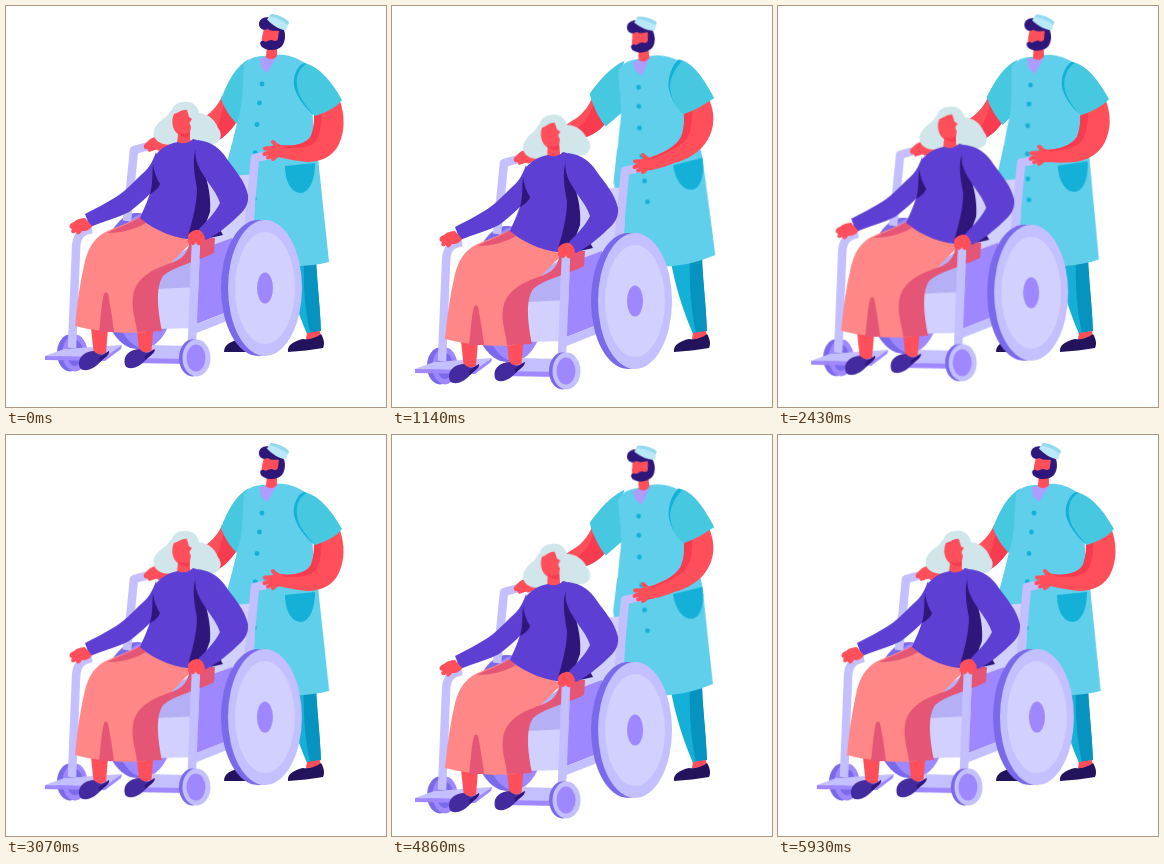
Recreate the animation shown at these times as an HTML page. Size 380 by 401 pixels, loop 6 s.

```html
<!DOCTYPE html>
<html lang="en">
<head>
<meta charset="utf-8">
<title>Nurse pushing a wheelchair</title>
<style>
html,body{margin:0;width:100%;height:100%;overflow:hidden;background:#fff}
svg{display:block;width:100vw;height:100vh}
/* every part swings along one sine, 1.5 s each way */
.chair,.lean,.nod,.sway,.morph{animation:1500ms cubic-bezier(.3642,0,.6358,1) infinite alternate}
.chair{animation-name:push}
.lean{animation-name:lean;transform-origin:274px 145px}
.nod{animation-name:nod;transform-origin:178px 135px}
.sway{animation-name:sway;animation-delay:-750ms;transform-origin:0 150px}
.morph{animation-name:morph}
@keyframes push{from{transform:translate(0,0)}to{transform:translate(-18.5px,15px)}}
@keyframes lean{from{transform:rotate(0deg)}to{transform:rotate(-9.5deg)}}
@keyframes nod{from{transform:rotate(0deg)}to{transform:rotate(-5deg)}}
@keyframes sway{from{transform:skewX(-1.05deg)}to{transform:skewX(1.05deg)}}
@keyframes morph{to{d:var(--to)}}
.skin{fill:#ff4f5b}.skin2{fill:#f93b4f}
.coat{fill:#5fcfeb}.sleeve{fill:#46c8e0}.trim{fill:#14b0d8}.deep{fill:#0793c0}
.ink{fill:#2f167a}.shoe{fill:#23125c}
.knit{fill:#5d3fd3}.slip{fill:#432a9f}
.pink{fill:#ff8787}.rose{fill:#e55575}
.pale{fill:#d1d0ff}.lilac{fill:#c4bfff}.mid{fill:#9f88ff}.dark{fill:#7a69ea}
.hair{fill:#d0e6ea}
.bar{fill:none;stroke:#c4bfff;stroke-width:8.5;stroke-linejoin:round}
.finger{fill:none;stroke:#ff4f5b;stroke-width:4;stroke-linecap:round}
</style>
</head>
<body>
<svg viewBox="0 0 380 401" preserveAspectRatio="none">

<!-- nurse: legs, far arm, coat, head -->
<path class="shoe" d="M218 346C218 338 225 335 236 333L244 346Z"/>
<path class="trim" d="M278 250C282 276 290 302 301 328L315 325C314 300 311 275 309 250Z"/>
<path class="deep" d="M298 250C297 280 299 305 304 327L315 325C314 300 311 275 310 250Z"/>
<path class="skin" d="M301 327L314 325L315 334C309 336 304 335 300 333Z"/>
<path class="shoe" d="M282 346C281 339 288 335 297 333C303 334 310 332 315 328C318 333 319 338 317 342C306 344 294 345 282 346Z"/>

<path class="skin morph" d="M216 90C212 100 204 108 194 114L150 134L152 145L205 138C216 134 224 126 232 114Z"
 style="--to:path('M200 85C197 97 190 108 178 115L131 149L133 160L185 133C197 129 207 124 214 114Z')"/>
<path class="skin2 morph" d="M232 114C224 126 216 134 205 138L206 128C213 120 215 112 218 98Z"
 style="--to:path('M213 114C207 124 197 129 185 133L177 124C190 118 195 110 200 94Z')"/>
<path class="sleeve morph" d="M243 53C230 60 222 75 215 93C219 103 224 111 231 118L240 108L242 56Z"
 style="--to:path('M231 55C216 62 205 74 195 87C198 100 204 112 211 121L231 104L228 63Z')"/>

<g class="sway">
  <path class="coat morph" d="M226 138L218 168L228 258L270 260C290 261 308 260 323 256L312 152L308 138Z"
   style="--to:path('M225 144L222 178L238 258L262 261C284 261 304 256 322 248L310 150L307 138Z')"/>
</g>
<g class="lean">
  <path class="coat" d="M257 50C248 50 240 54 238 60C236 78 238 97 231 117L224 146L218 168L308 154C307 140 308 120 306 100L299 57C288 50 278 48 270 49Z"/>
  <path d="M254 52L272 49L261 67L255 61Z" fill="#ae9cff"/>
  <path class="skin" d="M261 40L271 41L271 50C268 54 263 54 260 51Z"/>
  <path class="trim" d="M279 160L309 157C309 173 304 186 295 187C285 187 279 175 279 160Z"/>
  <g class="trim">
    <circle cx="256" cy="78" r="2.4"/><circle cx="253.5" cy="97" r="2.4"/>
    <circle cx="251" cy="118.5" r="2.4"/><circle cx="249.2" cy="146.7" r="2.4"/>
    <circle cx="248.5" cy="171.7" r="2.4"/><circle cx="248.4" cy="192.7" r="2.4"/>
  </g>
  <path class="skin" d="M258 22L275 23L275 40L257 40C254 34 257 29 258 22Z"/>
  <path class="ink" d="M263 11.500C257 10.500 253 14 253 18C253 23 258 25 262 23C266 26 270 24 273 25L272 32C272 35 269 36 266 34C262 34 260 37 258 35C254 34 253 38 256 41C261 45.500 272 45 276 40C279 36 280 30 278 24L264 13Z"/>
  <path d="M265 8C271 8 279 12 283 16L280 24.500C274 24 266 19 261 13.500Z" fill="#b9e8f8"/>
  <path d="M265 8C271 8 279 12 283 16L282 19C277 15 270 11 263.500 10.500Z" fill="#93d9ee"/>
</g>

<!-- wheelchair and passenger -->
<g class="chair">
  <ellipse class="dark" cx="131" cy="275" rx="37" ry="68"/>
  <ellipse class="mid" cx="138" cy="275" rx="33" ry="67"/>
  <path class="bar" d="M150 138L128 144L121 215"/>
  <path class="skin" d="M154 131C149 130 146 132 143 134L138 139C137 142 139 144 141 143L143 146L149 144L156 143Z"/>

  <path class="pale" d="M200 172L250 168L247 240L190 245Z"/>
  <path class="pale" d="M145 276L192 272L190 322L152 323Z"/>
  <path d="M150 262L192 236L192 281L150 283Z" fill="#b5b0f6"/>
  <path class="mid" d="M188 246L226 232L226 304L188 319Z"/>
  <path class="lilac" d="M188 319L226 304L226 313L188 328Z"/>
  <path class="bar" d="M268 148L249 152L242 228"/>

  <ellipse class="dark" cx="64" cy="347" rx="13" ry="18.500"/>
  <ellipse class="mid" cx="69" cy="347" rx="12.500" ry="18.500"/>
  <ellipse class="dark" cx="69" cy="347" rx="8" ry="13"/>
  <path class="bar" d="M86 223C74 225 70 231 70 244L66 342"/>
  <path class="lilac" d="M39 350L58 343L116 339L99 352Z"/>
  <path class="mid" d="M39 350L99 351L116 339L115 343L99 355L39 354Z"/>
  <path class="lilac" d="M142 339L184 340L184 354L124 353Z"/>
  <path class="mid" d="M124 352L184 353L184 358L126 357Z"/>
  <path class="bar" d="M190 236L186 336"/>
  <ellipse class="dark" cx="186.500" cy="352" rx="13.500" ry="18.500"/>
  <ellipse class="lilac" cx="190.500" cy="352" rx="14" ry="18.500"/>
  <ellipse class="mid" cx="190" cy="352" rx="9.500" ry="13.500"/>

  <g id="foot">
    <path class="skin" d="M85 322L102 322L100 347L88 350Z"/>
    <path class="slip" d="M73 357C73 350 80 345 88 345C92 350 98 349 103 345C104 348 100 351 96 354C90 361 84 365 77 364C74 363 73 361 73 357Z"/>
    <path class="ink" d="M93 352L103 345C104 348 98 352 94 356Z"/>
  </g>
  <use href="#foot" x="45.500" y="-2"/>

  <path class="pink" d="M134 211C116 220 104 223 96 228C86 235 82 244 79 255C74 276 71 298 69 320C92 326 118 328 140 326L140 280L160 262L186 236Z"/>
  <path class="rose" d="M101 227C112 221 124 218 134 211L140 217C128 224 114 227 101 227Z"/>
  <path class="rose" d="M98 288C95 300 95 312 93 326L108 326C106 310 104 298 102 288C101 286 99 286 98 288Z"/>
  <path class="rose" d="M184 232L209 232L208 247C190 256 168 260 157 270C149 282 152 305 156 325L131 326C130 314 125 304 127 290C130 270 150 262 168 256C180 251 183 243 184 232Z"/>
  <path class="bar" d="M190 236L188 285"/>

  <path class="ink" d="M204 232L217 229L212 220Z"/>
  <g class="nod">
    <path class="hair" d="M178 96C186 95 192 100 193 107C203 108 209 114 212 122C217 128 215 136 208 138C198 140 190 138 184 134L172 137C162 141 149 138 147.500 128C147 120 155 114 160 111C163 108 164 105 166 104C167 99 172 96 178 96Z"/>
    <path class="skin" d="M168 108C172 107 177 103 181 104L183 111L186 113L183.500 117L185 121L184 126L184 138L171 138L172 128C166 124 165 114 168 108Z"/>
    <path class="skin2" d="M172 126C176 128 180 128 184 126L183 131C178 132 174 130 172 126Z"/>
  </g>

  <path class="knit" d="M172 136C160 138 148 146 146 158C150 180 140 198 134 212C150 226 172 233 188 234L201 200L200 150C200 142 196 134 187 133C182 138 176 138 172 136Z"/>
  <path class="knit" d="M150 146C146 158 141 164 135 169C126 178 118 186 110 191C100 197 89 203 79 208L84 221C98 215 112 212 123 206C134 198 142 190 148 184L154 160Z"/>
  <path class="ink" d="M147 158C146 168 147 178 144 188C150 185 153 181 154 178C150 172 148 165 147 158Z"/>
  <path class="ink" d="M193 137C185 148 188 166 191 182C191 198 187 212 182 230L196 228L204 206C205 194 203 182 200 172L192 152Z"/>
  <path class="knit" d="M192 134C206 136 214 142 221 153C229 164 239 175 242 189C243 199 238 205 231 211C221 221 210 229 200 234C196 231 193 227 193 223C201 215 209 207 214 197C210 183 193 168 190 153C189 144 189 139 192 134Z"/>

  <path class="skin" d="M79 212L86 220C83 225 79 225 76 225C74 229 71 230 70 226C66 229 64 226 66 223C62 222 63 217 68 216C71 213 75 212 79 212Z"/>
  <path class="skin" d="M190 224C194 223 197 226 199 232C196 234 197 238 194 239C192 240 190 238 190 236C188 240 186 240 185 237C182 238 181 235 182 232C181 228 185 225 190 224Z"/>

  <ellipse class="dark" cx="252" cy="282" rx="37" ry="68"/>
  <ellipse class="lilac" cx="259" cy="282" rx="37" ry="68"/>
  <ellipse class="pale" cx="259" cy="282" rx="30" ry="56"/>
  <ellipse class="mid" cx="259" cy="282" rx="8" ry="15.500"/>
</g>

<!-- nurse: near arm -->
<path class="skin morph" d="M310 106L334 95C339 110 339 125 333 138C327 151 314 156 301 156C290 155 282 153 272 151L272 139C288 141 300 138 305 130C308 122 308 115 310 106Z"
 style="--to:path('M289 105L315 94C320 107 321 119 313 133C306 145 293 153 280 157C273 161 263 165 252 167L251 155C265 149 280 143 286 132C290 124 290 115 289 105Z')"/>
<path class="skin2 morph" d="M308 107L316 104C315 118 315 128 309 136C303 142 288 143 274 141L274 139C288 141 300 138 305 130C308 122 308 115 308 107Z"
 style="--to:path('M289 105L298 102C298 116 297 127 290 135C284 142 268 149 254 157L254 155C265 149 280 143 286 132C290 124 290 115 289 105Z')"/>
<path class="sleeve morph" d="M298 57C313 60 326 76 336 94C330 102 319 107 309 110C300 103 291 92 288 80C287 70 291 60 298 57Z"
 style="--to:path('M285 53C299 55 311 74 320 92C310 98 300 104 289 108C281 102 277 94 275 82C274 72 278 59 285 53Z')"/>
<path class="trim morph" d="M298 57C291 60 287 70 288 80C291 92 300 103 309 110C298 98 292 90 291 79C290 69 294 61 301 58Z"
 style="--to:path('M285 53C278 59 274 72 275 82C276 88 277 92 279 96C277 92 276 84 276 80C277 70 283 60 288 55Z')"/>
<g class="chair">
  <path class="skin" d="M277 140L270 137L264 142L261 147L265 151L277 151Z"/>
  <path class="finger" d="M271 140L267 136M268 142L259 142.500M267 145L258.500 148M268 149L262 151.500M272 149L267 153"/>
</g>
</svg>
</body>
</html>
```
